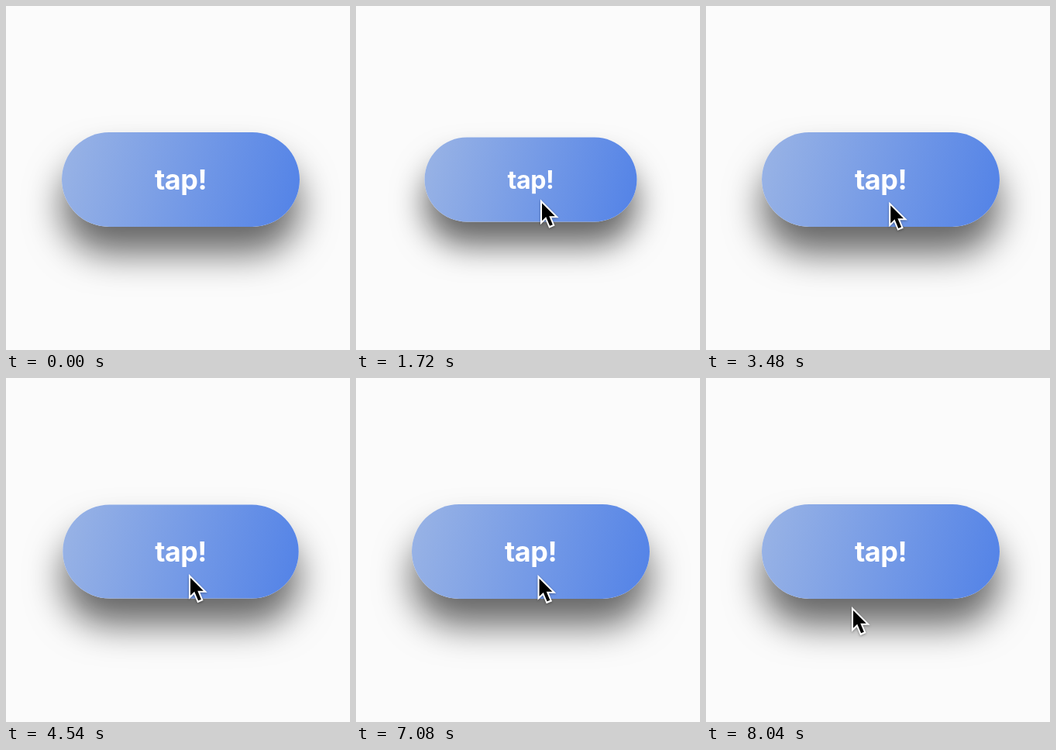
Write an HTML page that moves like this. It is 444 px wide and 444 px high and loops after 9620 ms.

```html
<!DOCTYPE html>
<html lang="en">
<head>
<meta charset="utf-8">
<title>Tap button</title>
<style>
html, body { margin: 0; width: 100%; height: 100%; overflow: hidden; background: #fbfbfb; }
#button {
  position: absolute; left: 72px; top: 162.7px; width: 307px; height: 122.8px;
  display: flex; align-items: center; justify-content: center;
  border-radius: 62px;
  background: linear-gradient(105deg, #9ab4e5, #5282e7);
  box-shadow: 0 34px 47px rgba(0, 0, 0, .6);
  color: #fff; font: 700 36px Inter, sans-serif; letter-spacing: -.5px;
}
#cursor {
  position: absolute; left: 0; top: 0; overflow: visible;
  filter: drop-shadow(0 1px 1.5px rgba(0, 0, 0, .35));
}
</style>
</head>
<body>
<div id="button">tap!</div>
<svg id="cursor" width="24" height="38" viewBox="8.2 4.9 11.75 18.6">
  <path fill="#fff" d="M8.2 20.9v-16l11.6 11.6H13l-.4.1zM17.3 21.6l-3.6 1.5L9 12l3.7-1.5z"/>
  <path d="M9.2 7.3v11.2l3-2.9.4-.1h4.8z"/>
  <rect x="12.5" y="13.6" width="2" height="8" transform="matrix(.9221 -.3871 .3871 .9221 -5.7605 6.5909)"/>
</svg>
<script>
const LOOP = 9620;
const button = document.getElementById('button');
const cursor = document.getElementById('cursor');

const linear = p => p;
const easeOut = p => 1 - (1 - p) ** 3.4;
const easeInOut = p => p * p * (3 - 2 * p);

// [time, target scale]
const presses = [[1545, .9], [3075, 1], [4522, .9], [6024, 1]];
// [start, end, x, y, easing]
const moves = [
  [560, 1180, 238, 249.5, easeOut],
  [3240, 3540, 236, 253, easeInOut],
  [7060, 7160, 229, 258, linear],
  [7340, 7360, 228, 259, linear],
  [7600, 8040, 188, 295, easeInOut]
];

// Underdamped spring from 0 to 1: stiffness 550, damping 30, mass 1
function spring(ms) {
  const t = ms / 1000, decay = 15, freq = Math.sqrt(550 - decay * decay);
  return 1 - Math.exp(-decay * t) * (Math.cos(freq * t) + decay / freq * Math.sin(freq * t));
}

function scaleAt(t) {
  let scale = 1;
  for (const [start, target] of presses) {
    if (t > start) scale += (target - scale) * spring(t - start);
  }
  return scale;
}

function cursorAt(t) {
  let x = 250, y = 446;
  for (const [start, end, toX, toY, ease] of moves) {
    const p = ease(Math.min(1, Math.max(0, (t - start) / (end - start))));
    x += (toX - x) * p;
    y += (toY - y) * p;
  }
  return [x, y];
}

function draw() {
  const t = performance.now() % LOOP;
  const [x, y] = cursorAt(t);
  button.style.transform = `scale(${scaleAt(t)})`;
  cursor.style.transform = `translate(${x}px, ${y}px)`;
  requestAnimationFrame(draw);
}
draw();
</script>
</body>
</html>
```
